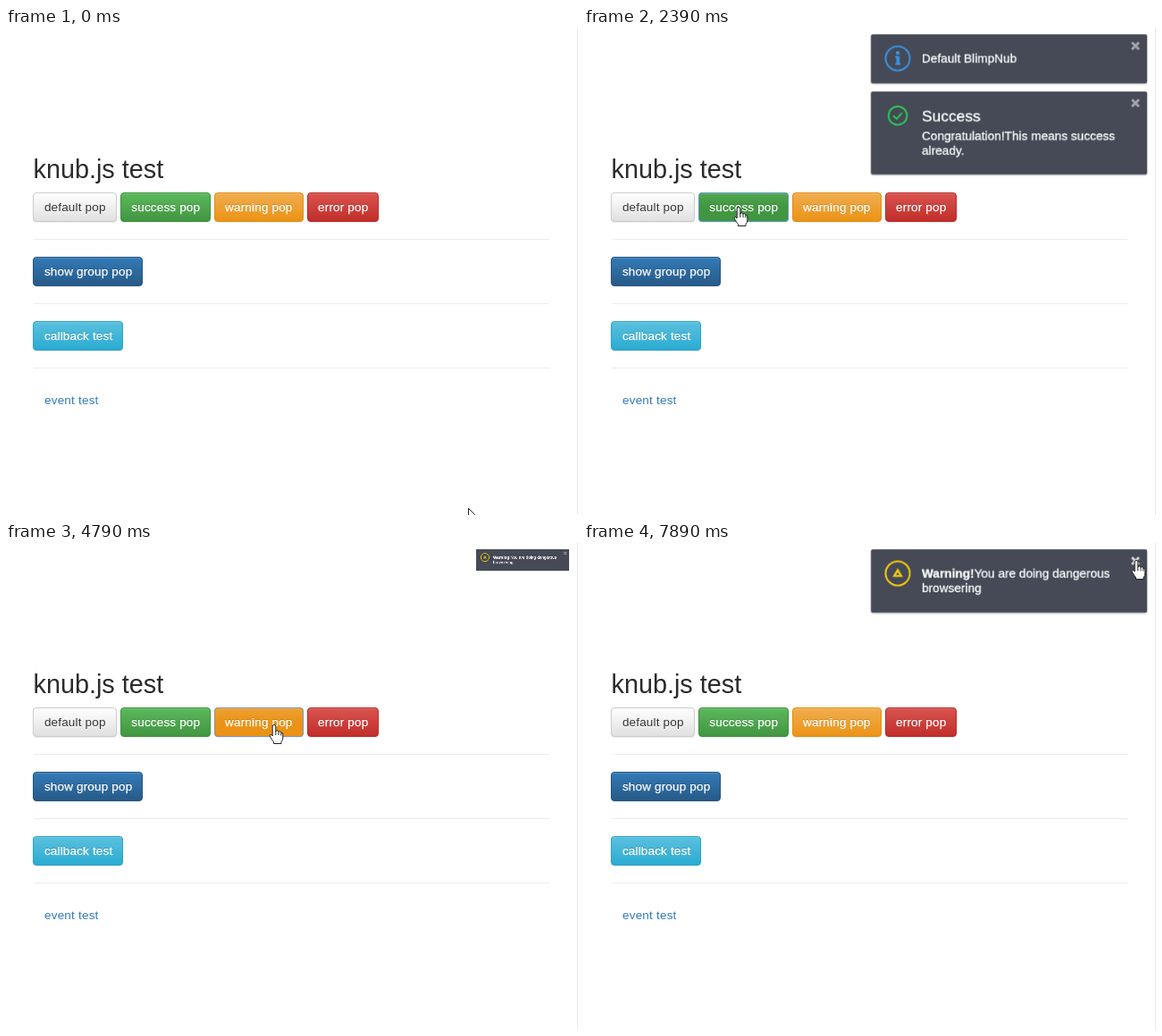
Recreate the animation shown at these times as an HTML page. Size 640 px wide and 545 px high, loop 8 s.

```html
<!DOCTYPE html>
<html lang="en">
<head>
<meta charset="utf-8">
<title>Popup test</title>
<style>
html, body { margin: 0; width: 100%; height: 100%; overflow: hidden; background: #fff; }
body { position: relative; font: 13.5px "Liberation Sans", Arial, sans-serif; color: #333; }
.stage { position: absolute; left: 0; top: 0; width: 640px; height: 545px; overflow: hidden; }
.stage > * { position: absolute; box-sizing: border-box; white-space: nowrap; }
.edge { left: 639px; top: 0; width: 1px; height: 545px; background: #e9e9e9; }
h1 { left: 30.5px; top: 142px; margin: 0; font-size: 28.8px; font-weight: 400; line-height: 32px; color: #2b2b2b; }
hr { left: 31px; width: 577px; height: 1px; margin: 0; border: 0; background: #ececec; }

.btn {
  height: 33px; padding: 0 11px 0 11.5px; line-height: 31px; letter-spacing: .17px;
  color: #fff; text-shadow: 0 -1px 0 rgba(0,0,0,.2); -webkit-text-stroke: .25px;
  border: 1px solid var(--line); border-radius: 4px;
  background: var(--low) linear-gradient(var(--high), var(--low)) 0 0 repeat-x;
  box-shadow: inset 0 1px 0 rgba(255,255,255,.15), 0 1px 1px rgba(0,0,0,.075);
  outline: 1.5px solid transparent; outline-offset: -1px;
  animation: 8s step-end infinite;
}
.default { --high: #fff; --low: #e0e0e0; --line: #ccc; color: #333; text-shadow: 0 1px 0 #fff; -webkit-text-stroke: 0; animation-name: press-default; }
.success { --high: #5cb85c; --low: #419641; --line: #3e8f3e; animation-name: press-success; }
.warning { --high: #f0ad4e; --low: #eb9316; --line: #e38d13; animation-name: press-warning; }
.error { --high: #d9534f; --low: #c12e2a; --line: #b92c28; animation-name: press-error; }
.primary { --high: #337ab7; --low: #265a88; --line: #245580; }
.info { --high: #5bc0de; --low: #2aabd2; --line: #28a4c9; }
.link { left: 43px; top: 409px; line-height: 16px; letter-spacing: .2px; color: #337ab7; }

.pop {
  left: 321px; width: 309px; background: #454a56; color: #fff; border-radius: 2px;
  box-shadow: 0 1px 2px rgba(0,0,0,.2); line-height: 16.8px; letter-spacing: .07px;
  -webkit-text-stroke: .3px; transform-origin: 100% 0; animation: 8s ease-in-out infinite;
}
.pop p { position: absolute; left: 57px; top: 19.7px; margin: 0; }
.pop h2 { position: absolute; left: 57px; top: 17.2px; margin: 0; font-size: 17.3px; font-weight: 400; line-height: 21.6px; }
.pop h2 + p { top: 42px; }
.icon { position: absolute; left: 14.5px; top: 12.2px; width: 30px; height: 30px; fill: none; stroke: currentColor; stroke-width: 2; }
.close { position: absolute; right: 8.5px; top: 7.5px; width: 10px; height: 10px; stroke: #fff; stroke-width: 2.7; opacity: .5; animation: lit 8s step-end infinite; }

.pointer { left: 0; top: 0; width: 30px; height: 30px; overflow: visible; stroke-linejoin: round; animation: travel 8s infinite; }
.hand { animation: show-hand 8s step-end infinite; }
.arrow { animation: show-arrow 8s step-end infinite; }

/* Button hover, then focus ring, then release */
@keyframes press-default {
  0%, 21.25% { background-position: 0 0; outline-color: transparent; }
  7.25% { background-position: 0 -15px; outline-color: transparent; }
  8.75% { background-position: 0 -15px; outline-color: #7ea7e6; }
}
@keyframes press-success {
  0%, 41.75% { background-position: 0 0; outline-color: transparent; }
  20.25% { background-position: 0 -15px; outline-color: transparent; }
  21.25% { background-position: 0 -15px; outline-color: rgba(100,155,235,.75); }
}
@keyframes press-warning {
  0%, 77.5% { background-position: 0 0; outline-color: transparent; }
  55.5% { background-position: 0 -15px; outline-color: transparent; }
  58% { background-position: 0 -15px; outline-color: rgba(100,150,225,.8); }
}
@keyframes press-error {
  0%, 93.2% { background-position: 0 0; outline-color: transparent; }
  75% { background-position: 0 -15px; outline-color: transparent; }
  77.5% { background-position: 0 -15px; outline-color: rgba(100,150,235,.8); }
}

@keyframes pop-default {
  0%, 9.24% { transform: scale(0); }
  9.25% { transform: scale(.2); }
  14%, 49.2% { transform: scale(1.1); }
  14.25%, 48.2% { transform: scale(1); }
  0%, 48.2% { opacity: 1; }
  53.2%, 100% { transform: scale(0); opacity: 0; }
}
@keyframes pop-success {
  0%, 23.74% { transform: scale(0); }
  23.75% { transform: scale(.2); }
  28.5%, 42.75% { transform: scale(1.1); }
  28.75%, 41.75% { transform: scale(1); }
  0%, 41.75% { opacity: 1; }
  46.75%, 100% { transform: scale(0); opacity: 0; }
}
@keyframes pop-warning {
  0%, 58.59% { transform: scale(0); }
  58.6% { transform: scale(.2); }
  63.35% { transform: scale(1.1); }
  63.6%, 100% { transform: scale(1); }
}
@keyframes pop-error {
  0%, 78.49% { transform: scale(0); }
  78.5% { transform: scale(.2); }
  83.25%, 92.75% { transform: scale(1.1); }
  83.5%, 91.75% { transform: scale(1); }
  0%, 91.75% { opacity: 1; }
  96.75%, 100% { transform: scale(0); opacity: 0; }
}
@keyframes lit { 0% { opacity: .75; } 8.75%, 100% { opacity: .5; } }

@keyframes travel {
  0%, .85% { transform: translate(517px, 537px); animation-timing-function: ease-in; }
  5% { transform: translate(180px, 337px); animation-timing-function: linear; }
  6.4% { transform: translate(75px, 228px); animation-timing-function: ease-out; }
  7.8%, 18.5% { transform: translate(100px, 200px); animation-timing-function: ease-in-out; }
  20.5%, 33.75% { transform: translate(173px, 200px); animation-timing-function: ease-in-out; }
  39.5%, 42.4% { transform: translate(613px, 85px); animation-timing-function: linear; }
  43.6% { transform: translate(612px, 45px); animation-timing-function: ease-out; }
  44.5%, 49.8% { transform: translate(611px, 30px); animation-timing-function: ease-in-out; }
  56.5%, 72.2% { transform: translate(300px, 203px); animation-timing-function: linear; }
  74.25% { transform: translate(340px, 200px); animation-timing-function: ease-out; }
  76.25%, 82.9% { transform: translate(380px, 204px); animation-timing-function: ease-in; }
  87.75% { transform: translate(563px, 135px); animation-timing-function: ease-out; }
  90.6%, 94% { transform: translate(616px, 98px); animation-timing-function: linear; }
  95.6% { transform: translate(618px, 50px); animation-timing-function: ease-out; }
  97.75%, 100% { transform: translate(618px, 19px); }
}
@keyframes show-hand {
  0%, 34.5%, 43%, 50.5%, 83.6%, 95% { opacity: 0; }
  7%, 39%, 44.2%, 55.5%, 90.4%, 96.75% { opacity: 1; }
  100% { opacity: 1; }
}
@keyframes show-arrow {
  0%, 34.5%, 43%, 50.5%, 83.6%, 95% { opacity: 1; }
  7%, 39%, 44.2%, 55.5%, 90.4%, 96.75% { opacity: 0; }
  100% { opacity: 0; }
}
</style>
</head>
<body>
<svg width="0" height="0" style="position:absolute">
  <symbol id="cross" viewBox="0 0 10 10"><path d="M1 1L9 9M9 1L1 9"/></symbol>
</svg>
<div class="stage">
  <div class="edge"></div>
  <h1>knub.js test</h1>
  <div class="btn default" style="left:30.4px;top:184px">default pop</div>
  <div class="btn success" style="left:127.8px;top:184px">success pop</div>
  <div class="btn warning" style="left:232.6px;top:184px">warning pop</div>
  <div class="btn error" style="left:336.6px;top:184px">error pop</div>
  <hr style="top:236px">
  <div class="btn primary" style="left:30.4px;top:256px">show group pop</div>
  <hr style="top:308px">
  <div class="btn info" style="left:30.4px;top:328px">callback test</div>
  <hr style="top:380px">
  <div class="link">event test</div>

  <div class="pop" style="top:7px;height:55px;animation-name:pop-default">
    <svg class="icon" style="color:#3b8fe0"><circle cx="15" cy="15" r="13.5"/><path stroke-width="4" d="M13 8.8h4"/><path stroke-width="3.8" d="M15.2 12.4v9.4"/><path d="M12.2 13.4h3M12.2 21.3h6"/></svg>
    <p>Default BlimpNub</p>
    <svg class="close" style="animation-delay:-4.46s"><use href="#cross"/></svg>
  </div>
  <div class="pop" style="top:71px;height:93px;animation-name:pop-success">
    <svg class="icon" style="color:#2fbf55"><circle cx="15" cy="15" r="10.3"/><path d="M10.2 15.2l3.5 3.5 6.2-6.7"/></svg>
    <h2>Success</h2>
    <p>Congratulation!This means success<br>already.</p>
    <svg class="close" style="animation-delay:-4.88s"><use href="#cross"/></svg>
  </div>
  <div class="pop" style="top:7px;height:71px;animation-name:pop-warning">
    <svg class="icon" style="color:#f3c70d"><circle cx="15" cy="15" r="13.5"/><path stroke-width="2.4" d="M15 11.4l3.8 6.4h-7.6z"/></svg>
    <p><b>Warning!</b>You are doing dangerous<br>browsering</p>
    <svg class="close" style="animation-delay:-.26s"><use href="#cross"/></svg>
  </div>
  <div class="pop" style="top:87px;height:54px;animation-name:pop-error">
    <svg class="icon" style="color:#f4524f"><circle cx="15" cy="15" r="13.5"/><path stroke-width="3.6" d="M15 7.5v9.5M15 19v3.4"/></svg>
    <p>Error!Try again!</p>
    <svg class="close" style="animation-delay:-.77s"><use href="#cross"/></svg>
  </div>

  <svg class="pointer" fill="#fff" stroke="#222">
    <path class="arrow" d="M.5.5V16l3.6-3.4 2.5 5.8 2.4-1-2.5-5.7h4.8z"/>
    <g class="hand">
      <path d="M-1.8 13V2Q-1.8.5 0 .5T1.8 2V8Q2 6.8 3.4 6.9T5 8.6Q5.2 7.6 6.4 7.8T7.8 9.5Q9.8 9 9.8 11V15Q9.6 18 8 19.5V21.5H-.5V19.5Q-2.4 17.5-4 14.5-5.4 12.2-4.4 11.5T-1.8 13z"/>
      <path fill="none" d="M1.8 8v4M5 8.6V12M7.8 9.5v3"/>
    </g>
  </svg>
</div>
</body>
</html>
```
